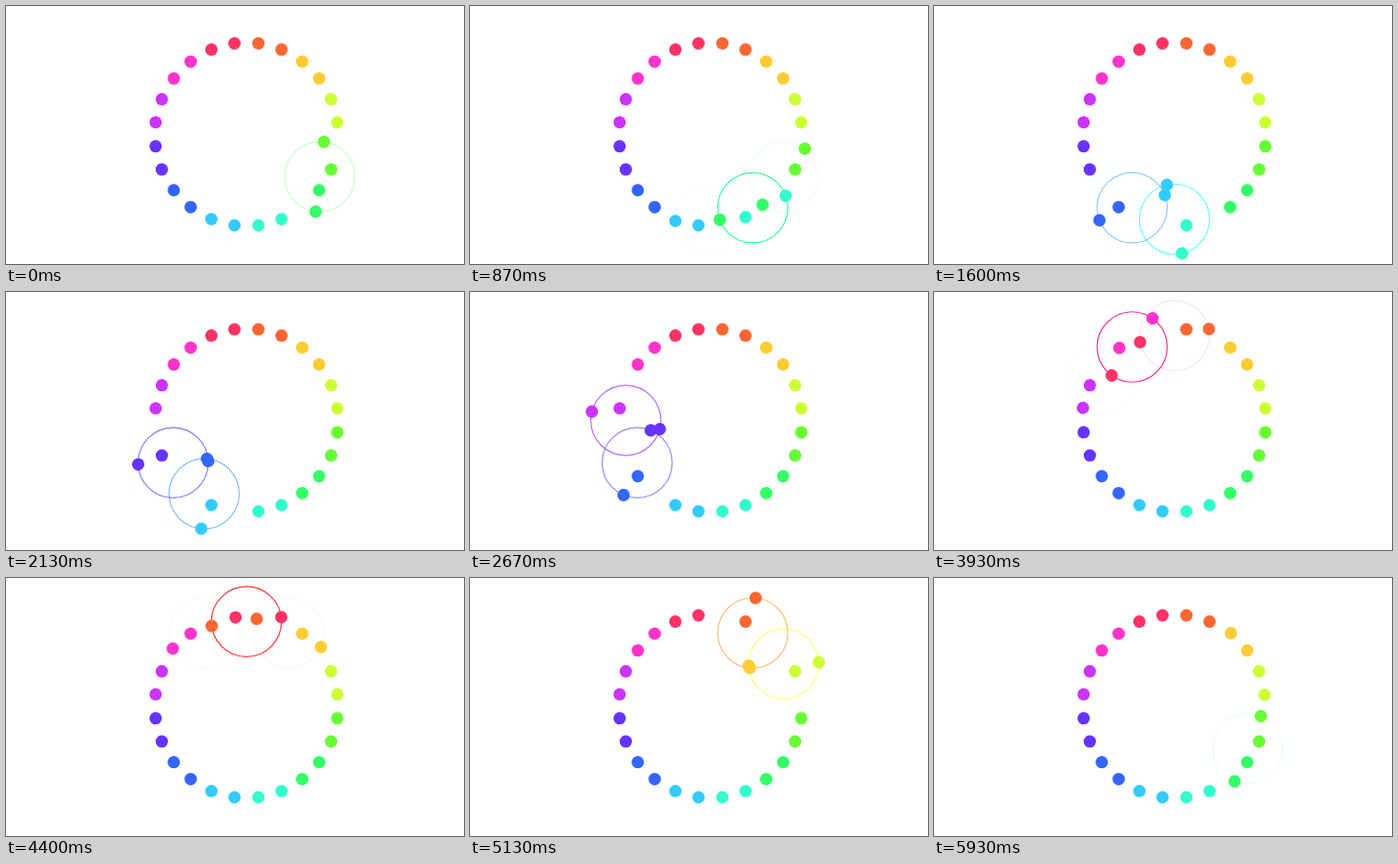
Animation of 480 by 270 pixels, one loop 5990 ms. Source, as an HTML page:

```html
<!DOCTYPE html>
<html lang="en">
<head>
<meta charset="utf-8">
<title>Turning colour ring</title>
<style>
  html, body { margin: 0; width: 100%; height: 100%; overflow: hidden; background: #fff; }
  svg { display: block; width: 480px; height: 270px; }
</style>
</head>
<body>
<svg id="stage" viewBox="0 0 480 270"></svg>
<script>
const LOOP = 5990;
const STEP = 1000 / 15;      // picture rate
const SPIN = 1200;           // length of one full turn
const FIRST = -214;          // start of the first turn
const STAGGER = 500;
const LAST = 5805;           // the first hub starts again before the loop ends
const HUBS = 12;
const CX = 252, CY = 134.3, RING = 96, DOT = 6.5;
const RAD = Math.PI / 180;
const SPREAD = 22.5 * RAD;
const HUB_RING = RING * Math.cos(SPREAD);
const ORBIT = RING * Math.sin(SPREAD);

const stage = document.getElementById('stage');

function add(parent, name, attrs) {
  const el = document.createElementNS('http://www.w3.org/2000/svg', name);
  for (const key in attrs) el.setAttribute(key, attrs[key]);
  return parent.appendChild(el);
}

const color = hue => `hsl(${hue % 360}, 100%, 60%)`;

// cubic-bezier(.42, 0, .58, 1)
function easeInOut(x) {
  if (x <= 0) return 0;
  if (x >= 1) return 1;
  let lo = 0, hi = 1;
  for (let i = 0; i < 24; i++) {
    const u = (lo + hi) / 2;
    if (1.26 * u - 0.78 * u * u + 0.52 * u * u * u < x) lo = u;
    else hi = u;
  }
  return lo * lo * (3 - 2 * lo);
}

const orbitLayer = add(stage, 'g', {});
const dotLayer = add(stage, 'g', {});

// Each hub carries the two dots that lie 22.5 degrees to either side of it.
const hubs = Array.from({ length: HUBS }, (_, i) => {
  const k = i + 1;
  const angle = 30 * k;
  const x = CX + HUB_RING * Math.cos(angle * RAD);
  const y = CY + HUB_RING * Math.sin(angle * RAD);
  const orbit = add(orbitLayer, 'circle', {
    cx: x, cy: y, r: ORBIT, fill: 'none',
    stroke: color(90 + angle), 'stroke-width': 1.2, opacity: 0
  });
  const pair = add(dotLayer, 'g', {});
  for (const side of [-1, 1]) {
    const a = angle * RAD + side * SPREAD;
    add(pair, 'circle', {
      cx: CX + RING * Math.cos(a), cy: CY + RING * Math.sin(a), r: DOT,
      fill: color(90 + angle + side * 15)
    });
  }
  return { k, x, y, orbit, pair };
});

function progress(k, t) {
  if (k === HUBS) return 0;  // the rightmost hub rests
  const start = k === 1 && t >= LAST ? LAST : FIRST + STAGGER * (k - 1);
  const p = (t - start) / SPIN;
  return p > 0 && p < 1 ? p : 0;
}

function draw(t) {
  for (const { k, x, y, orbit, pair } of hubs) {
    const p = progress(k, t);
    pair.setAttribute('transform', `rotate(${-360 * easeInOut(p)} ${x} ${y})`);
    orbit.setAttribute('opacity', easeInOut(1 - Math.abs(2 * p - 1)));
  }
}

const begin = performance.now();
function tick() {
  const t = (performance.now() - begin) % LOOP;
  draw(Math.floor((t + 4) / STEP) * STEP);
  requestAnimationFrame(tick);
}
draw(0);
requestAnimationFrame(tick);
</script>
</body>
</html>
```
